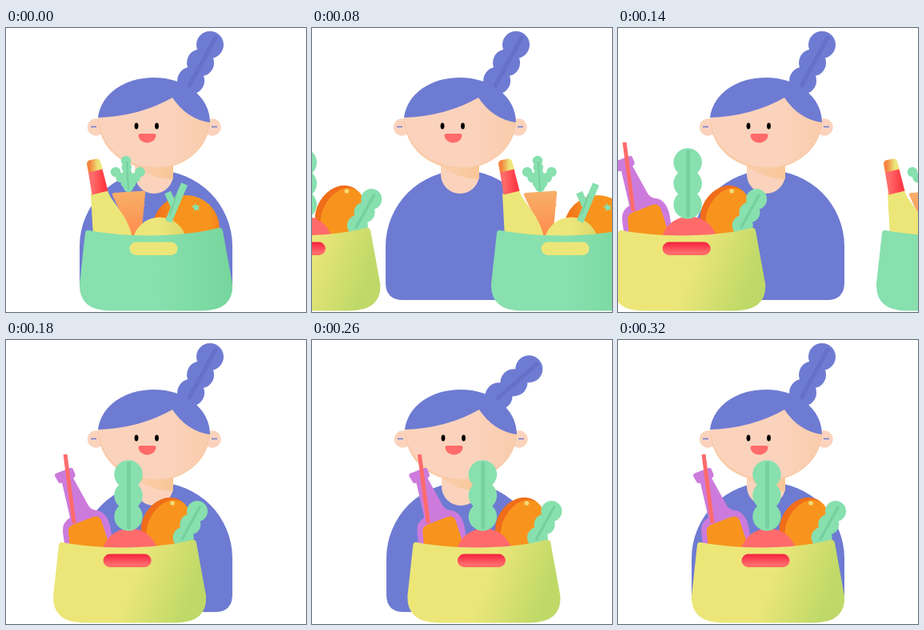
These frames come from a looping animation (375x355 px, 8000 ms). An HTML page:

```html
<!DOCTYPE html>
<html lang="en">
<head>
<meta charset="utf-8">
<title>Grocery baskets</title>
<style>
  html, body { margin: 0; width: 100%; height: 100%; overflow: hidden; background: #fff; }
  svg { display: block; width: 375px; height: 355px; }
  .line, .beads { fill: none; stroke-linecap: round; }
  .beads { stroke-dasharray: 0 1; }
  .purple { fill: #6e7bd2; }
  .skin { fill: #fbd3bd; }
  .orange { fill: #f8941d; }
  .red { fill: #ff6b6b; }
  .leaf { stroke: #87e0ae; }
  .vein { stroke: #76cfa0; }
</style>
</head>
<body>
<svg viewBox="0 0 375 355">
  <defs>
    <path id="basket" d="M104 253C150 262 220 262 265 250Q270 249 271 254L283 320Q285 353 245 353.5H130Q91 353 92 320L99 256Q100 252 104 253Z"/>
    <rect id="handle" x="154.500" y="267.500" width="60" height="16.500" rx="8.250"/>
    <linearGradient id="face"><stop offset=".6" stop-color="#fbd3bd"/><stop offset="1" stop-color="#f9cbaa"/></linearGradient>
    <linearGradient id="neck"><stop offset="0" stop-color="#fbcfae"/><stop offset="1" stop-color="#f8c596"/></linearGradient>
    <linearGradient id="green"><stop offset=".5" stop-color="#87e0ae"/><stop offset="1" stop-color="#76d69c"/></linearGradient>
    <linearGradient id="lime" y2=".2"><stop offset=".58" stop-color="#ece679"/><stop offset="1" stop-color="#bfd968"/></linearGradient>
    <linearGradient id="crimson" x2="0" y2="1"><stop offset="0" stop-color="#f5203f"/><stop offset=".8" stop-color="#ff6b6b"/></linearGradient>
    <linearGradient id="label"><stop offset=".2" stop-color="#ff6b6b"/><stop offset=".8" stop-color="#ff3b45"/></linearGradient>
    <linearGradient id="cap"><stop offset=".2" stop-color="#f4853f"/><stop offset=".7" stop-color="#ece679"/></linearGradient>
    <linearGradient id="carrot" x2="0" y2="1"><stop offset="0" stop-color="#f8b06a"/><stop offset="1" stop-color="#ff8a4c"/></linearGradient>
    <linearGradient id="fruit"><stop offset="0" stop-color="#f06a1a"/><stop offset=".35" stop-color="#f8941d"/><stop offset=".85" stop-color="#f8941d"/><stop offset="1" stop-color="#f5821a"/></linearGradient>
    <linearGradient id="lemon"><stop offset=".5" stop-color="#ede67a"/><stop offset="1" stop-color="#dcd767"/></linearGradient>
  </defs>

  <g id="woman">
    <path class="purple" d="M92 273A95.500 95 0 0 1 283 273V318Q283 340 261 340H114Q92 340 92 318Z"/>
    <path class="skin" d="M161 165H209V183A24 24 0 0 1 161 183Z"/>
    <path fill="url(#neck)" d="M161 165H209V189Q181 188 161 173Z"/>
    <g id="ponytail">
      <path class="beads" stroke="#6e7bd2" stroke-width="34" pathLength="2.010" d="M255 21L231 66"/>
      <path class="line" stroke="#6670c6" stroke-width="5" d="M262 12L227 76"/>
    </g>
    <circle class="skin" cx="112.500" cy="124" r="10.700"/>
    <circle class="skin" cx="258" cy="124" r="10.700"/>
    <path stroke="#6e7bd2" stroke-width="1.400" d="M106 123.500H113M257 123.500H264"/>
    <path fill="#f9cba6" d="M115 112C115 150 147 176 185 176C223 176 255 150 255 115L208 84Z"/>
    <path fill="url(#face)" d="M115.500 110C117 148 148 173 186 174C223 174 254 150 255 115L208 84Z"/>
    <path class="purple" d="M115 112C119 82 148 62 185 62C224 62 255 86 255 118Q226 114 208 87Q168 110 115 112Z"/>
    <ellipse cx="163" cy="122.500" rx="2.400" ry="4.100"/>
    <ellipse cx="188.500" cy="122.500" rx="2.400" ry="4.100"/>
    <path class="red" d="M168 132H185Q187.500 132 187.500 134.500C187 140 182 143.500 176.500 143.500C171 143.500 166 140 165.500 134.500Q165.500 132 168 132Z"/>
  </g>

  <g id="greenBasket">
    <path fill="url(#carrot)" d="M135 206L172 203.500Q174.500 204 174 207L169 262H158L133 209Q132 206.500 135 206Z"/>
    <path class="line" stroke="#f9a45c" stroke-width="1.500" d="M152 221H173M146 235H165"/>
    <g class="beads leaf" stroke-width="12.500">
      <path pathLength="4.010" d="M150 166L153 199"/>
      <path pathLength="2.010" d="M137 180L150 194"/>
      <path pathLength="2.010" d="M167.500 180L156 194"/>
    </g>
    <path class="line vein" stroke-width="2" d="M151 168L153 202"/>
    <path fill="#ece679" d="M106 207L127 203C131 218 152 232 158 262H109Z"/>
    <path fill="url(#cap)" d="M101 170Q101 166 105 165L113 163.500Q117 163 118 167L121 177L103 181Z"/>
    <path fill="url(#label)" d="M103 180.500L120.500 176.500L127.500 203.500L107.500 208.500Z"/>
    <circle fill="url(#fruit)" cx="225" cy="251" r="42"/>
    <path fill="#87e0ae" d="M236 219L238.500 222L242 221.500L240.500 225L242 228L238 227L235 229L235 225.500L232 223L235.500 222Z"/>
    <circle fill="url(#lemon)" cx="192" cy="270.500" r="34"/>
    <g class="leaf" fill="none" stroke-width="8.500">
      <path d="M202 205.500L210 223"/>
      <path d="M223 195L203 242"/>
    </g>
    <path class="line vein" stroke-width="2" d="M213 209L205 233"/>
    <use href="#basket" fill="url(#green)"/>
    <use href="#handle" fill="#ece679"/>
  </g>

  <g id="yellowBasket">
    <path fill="#cc7bdc" d="M96 166.500L113 160Q116 159 117 162L119.500 168Q120 171 117 172.500L136 207Q139 212 146 213Q158 214 163 232L168 262H107L104 240Q103 228 113 222L103 178.500Q99 180 98 177L94 170Q93.500 167.500 96 166.500Z"/>
    <path class="orange" d="M111 240Q110 234 116 231L142 221Q149 219 152 225L164 262H113Z"/>
    <path stroke="#ff6b6b" stroke-width="5" d="M107 143L118 229"/>
    <ellipse fill="#f06d1a" cx="232" cy="231" rx="28.500" ry="36" transform="rotate(30 232 231)"/>
    <ellipse class="orange" cx="236" cy="233" rx="25" ry="35" transform="rotate(28 236 233)"/>
    <circle fill="#f3dc78" cx="241" cy="204" r="2.800"/>
    <circle class="red" cx="188" cy="271.500" r="36"/>
    <path class="beads leaf" stroke-width="35.500" pathLength="2.010" d="M186 168V221"/>
    <path class="line vein" stroke-width="5" d="M186.500 155V234"/>
    <path class="beads leaf" stroke-width="26" pathLength="2.010" d="M272 214L254.500 247"/>
    <path class="line vein" stroke-width="3.500" d="M275 209L253 249"/>
    <use href="#basket" fill="url(#lime)"/>
    <use href="#handle" fill="url(#crimson)"/>
  </g>
</svg>
<script>
  const LOOP = 8000, STEP = 20;
  const greenKeys = [[0, 0], [220, 363]];
  const yellowKeys = [[0, -329.5], [200, 0], [220, 33], [240, 36.5], [320, 0]];
  const swingKeys = [[200, 0], [220, 8], [240, 17], [260, 20], [320, 0]];

  // Linear interpolation between [time, value] keys, held after the last one.
  function track(keys, t) {
    const next = keys.findIndex(key => key[0] > t);
    if (next < 0) return keys[keys.length - 1][1];
    if (next === 0) return keys[0][1];
    const [t0, v0] = keys[next - 1], [t1, v1] = keys[next];
    return v0 + (v1 - v0) * (t - t0) / (t1 - t0);
  }

  const setTransform = (id, value) => document.getElementById(id).setAttribute('transform', value);

  function draw(now) {
    const t = Math.floor(now % LOOP / STEP) * STEP;
    const swing = track(swingKeys, t);
    setTransform('greenBasket', `translate(${track(greenKeys, t)})`);
    setTransform('yellowBasket', `translate(${track(yellowKeys, t)})`);
    setTransform('woman', `translate(${swing / 20})`);
    setTransform('ponytail', `rotate(${swing} 219.5 72)`);
  }

  let start;
  function tick(now) {
    start ??= now;
    draw(now - start);
    requestAnimationFrame(tick);
  }
  draw(0);
  requestAnimationFrame(tick);
</script>
</body>
</html>
```
